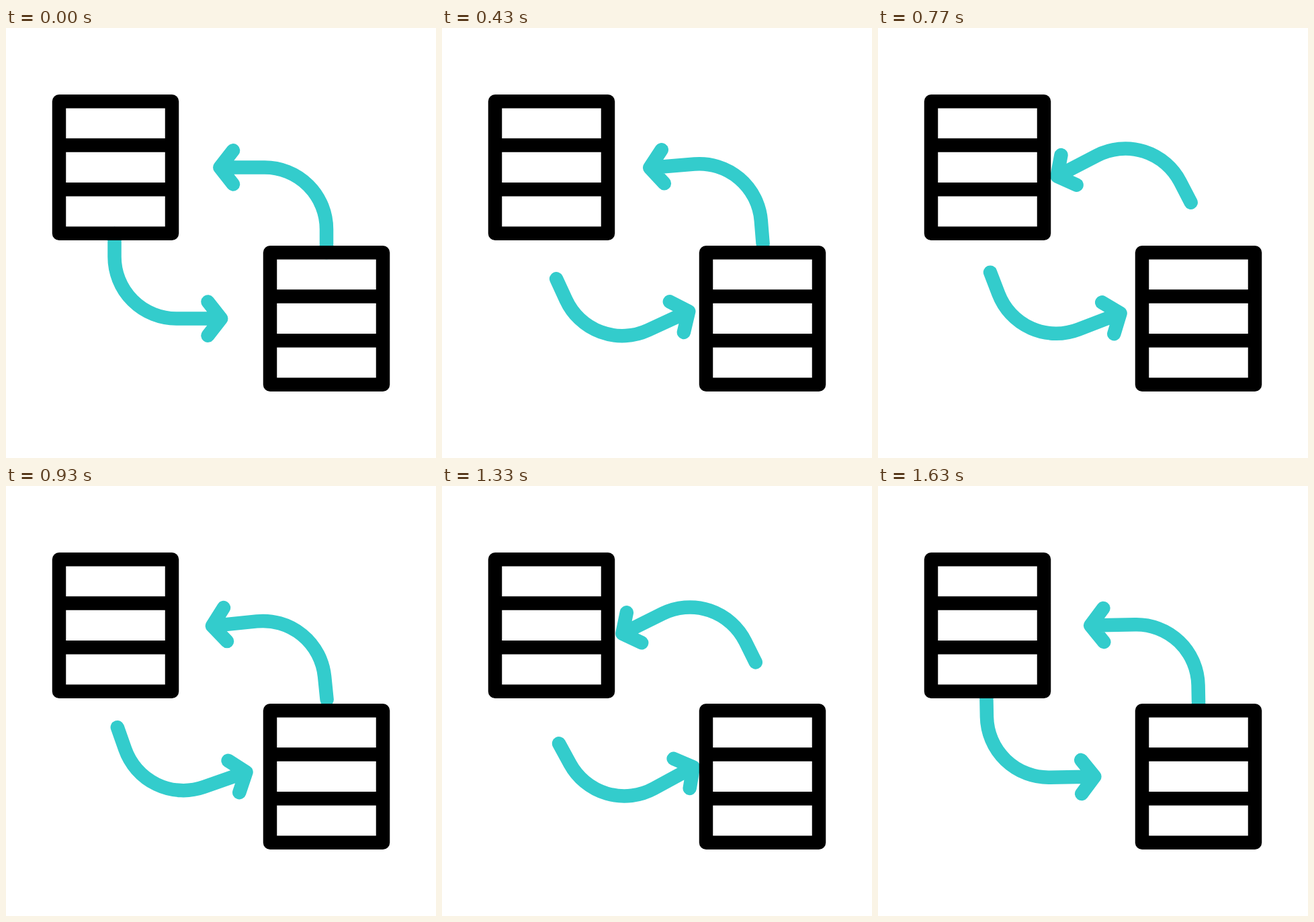
An HTML page for the animation above (1670 ms loop, 640x640 px).

```html
<!DOCTYPE html>
<html lang="en">
<head>
<meta charset="utf-8">
<title>Data exchange</title>
<style>
  html, body { margin: 0; width: 100%; height: 100%; overflow: hidden; background: #fff; }
  svg { display: block; width: 100vw; height: 100vh; }
</style>
</head>
<body>
<svg viewBox="0 0 640 640" fill="none" stroke-width="20.5" stroke-linecap="round" stroke-linejoin="round">
  <defs>
    <path id="arrow" d="M477 334V299.5A92 92 0 0 0 385 207.5H318.5M338 182.3L318.3 207.5L338 232.5"/>
    <path id="table" d="M79 109.3H247V305.8H79ZM79 174.5H247M79 240.3H247"/>
  </defs>
  <g stroke="#33cccc">
    <use id="upper" href="#arrow"/>
    <use id="lower" href="#arrow"/>
  </g>
  <g stroke="#000">
    <use href="#table"/>
    <use href="#table" x="314" y="225"/>
  </g>
</svg>
<script>
  const LOOP = 1670;
  const PIVOT = "319.25 320";

  // Steps of [tick, degrees], eased in and out; 30 ticks per second.
  const arrows = [
    { node: document.getElementById("upper"), base: 0,
      steps: [[0, 0], [7.3, 27.75], [15, 0], [22.5, 27.75], [30.3, 0], [38.8, 27.75], [47.6, 1.1]] },
    { node: document.getElementById("lower"), base: 180,
      steps: [[4, 0], [11.25, 28.6], [18.85, 0], [25.1, 28.6], [32.75, 0], [40, 28.6], [48.3, 1.1]] }
  ];

  const smooth = p => p * p * (3 - 2 * p);

  function swing(steps, tick) {
    const next = steps.findIndex(step => step[0] > tick);
    if (next === 0) return steps[0][1];
    if (next < 0) return steps[steps.length - 1][1];
    const [t0, a0] = steps[next - 1];
    const [t1, a1] = steps[next];
    return a0 + (a1 - a0) * smooth((tick - t0) / (t1 - t0));
  }

  // Ticks fall at 0, 30 and 70 ms of every 100 ms.
  function tickAt(ms) {
    const rest = ms % 100;
    return 3 * Math.floor(ms / 100) + (rest >= 70 ? 2 : rest >= 30 ? 1 : 0);
  }

  function draw(ms) {
    const tick = tickAt(ms % LOOP);
    for (const { node, base, steps } of arrows) {
      node.setAttribute("transform", `rotate(${base - swing(steps, tick)} ${PIVOT})`);
    }
  }

  const start = performance.now();
  function loop() {
    draw(performance.now() - start);
    requestAnimationFrame(loop);
  }
  draw(0);
  requestAnimationFrame(loop);
</script>
</body>
</html>
```
